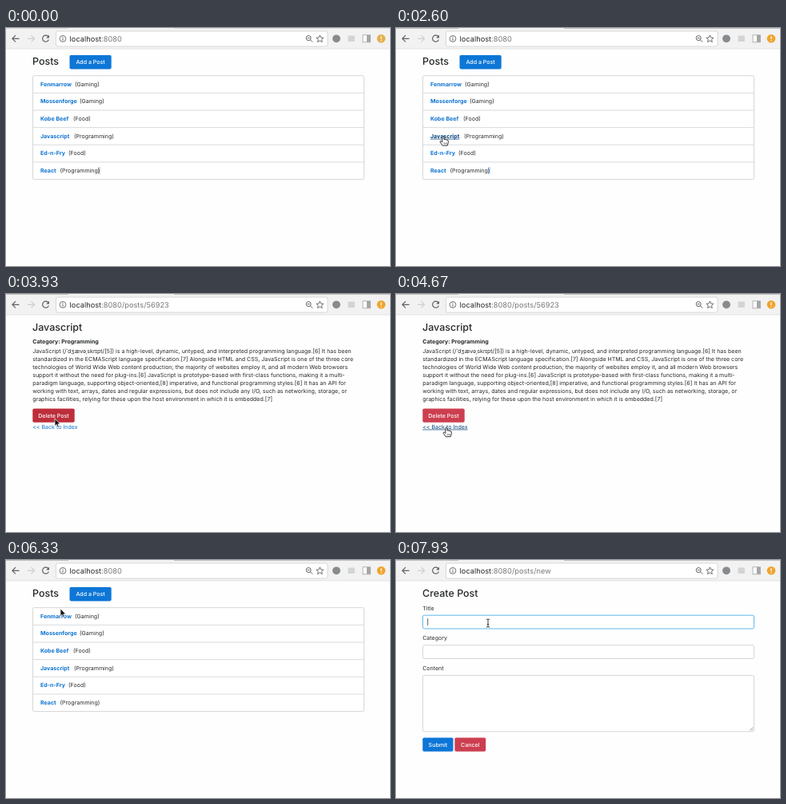
Write an HTML page that moves like this. It is 480 px wide and 298 px high and loops after 8000 ms.

```html
<!DOCTYPE html>
<html lang="en">
<head>
<meta charset="utf-8">
<title>Posts</title>
<style>
html, body { margin: 0; width: 100%; height: 100%; overflow: hidden; background: #fefefe; }
svg { display: block; width: 100%; height: 100%; }
text { font: 7.05px Inter, "Noto Sans", sans-serif; fill: #25282a; text-rendering: geometricPrecision; white-space: pre; }
.h3 { font-size: 12.5px; font-weight: 500; }
.b { font-weight: 700; }
.link { fill: #0d74d0; }
.link.hover { fill: #06437a; text-decoration: underline; }
.label { fill: #fff; font-weight: 500; text-anchor: middle; }
.blue { fill: #0d76d6; }
.blue.hover { fill: #0a5ba6; }
.red { fill: #cc3f50; }
.red.hover { fill: #bd2e3b; }
.url { font-size: 9.25px; }
.box { fill: #fff; stroke: #d4d6d8; }
.ico { fill: none; stroke: #5f6163; stroke-width: 1.2; }
</style>
</head>
<body>
<svg id="stage" viewBox="0 0 480 298"></svg>
<script>
const LOOP = 8000;
const OPEN_POST = 2960, BACK = 4760, NEW_POST = 7240, FOCUS = 7850, ENTER = 380;

const posts = [
  ["Fenmarrow", "Gaming", 86],
  ["Mossenforge", "Gaming", 92],
  ["Kobe Beef", "Food", 84],
  ["Javascript", "Programming", 85],
  ["Ed-n-Fry", "Food", 78],
  ["React", "Programming", 67.5]
];

const article = [
  "JavaScript (/ˈdʒævəˌskrɪpt/[5]) is a high-level, dynamic, untyped, and interpreted programming language.[6] It has been",
  "standardized in the ECMAScript language specification.[7] Alongside HTML and CSS, JavaScript is one of the three core",
  "technologies of World Wide Web content production; the majority of websites employ it, and all modern Web browsers",
  "support it without the need for plug-ins.[6] JavaScript is prototype-based with first-class functions, making it a multi-",
  "paradigm language, supporting object-oriented,[8] imperative, and functional programming styles.[6] It has an API for",
  "working with text, arrays, dates and regular expressions, but does not include any I/O, such as networking, storage, or",
  "graphics facilities, relying for these upon the host environment in which it is embedded.[7]"
];

// Pointer path: time, x, y
const path = [
  [ENTER, 150, 246], [860, 66, 194], [960, 60, 190], [1240, 45, 113.5], [1380, 45, 113.5],
  [1780, 50, 181], [1960, 53, 181], [2500, 59, 135.5], [3050, 59, 135.5],
  [3650, 61, 156], [4000, 61, 156], [4330, 63, 167], [5780, 63, 167],
  [6300, 68, 61], [6400, 68, 61], [6900, 104, 44], [7340, 104, 44], [7780, 115, 79], [LOOP, 115, 79]
];

const text = (x, y, s, cls = "", extra = "") =>
  `<text x="${x}" y="${y}" class="${cls}" ${extra}>${s.replace(/</g, "&lt;")}</text>`;
const rect = (x, y, w, h, attrs) => `<rect x="${x}" y="${y}" width="${w}" height="${h}" ${attrs}/>`;
const hot = (x, y, w, h, kind) => `data-hot="${x},${y},${w},${h},${kind}"`;
const button = (x, y, w, color, label, kind) =>
  rect(x, y, w, 17.4, `rx="1.8" class="${color}" ${hot(x, y, w, 17.4, kind)}`) +
  text(x + w / 2, y + 11.1, label, "label");
const field = (y, h, id) =>
  rect(33.5, y, 414, h, `rx="1.8" class="box" id="${id}" ${hot(33, y, 415, h, "beam")}`);

const toolbar = `
  ${rect(0, 0, 480, 26, 'fill="#f2f2f2"')}
  ${rect(0, 25.6, 480, 0.8, 'fill="#dcdcdc"')}
  <path id="tabs" d="M0 .4H78M210 .4H480" stroke-width=".9"/>
  <path class="ico" d="M16.5 13.3H8M12 9.2L7.9 13.3L12 17.4"/>
  <path class="ico" style="stroke:#cfcfcf" d="M27 13.3H35.5M31.5 9.2L35.6 13.3L31.5 17.4"/>
  <path class="ico" d="M53 11A4 4 0 1 0 53.4 14.6"/>
  <path d="M54 8.8V12.6H50.2Z" fill="#5f6163"/>
  ${rect(62.5, 4, 339.5, 19, 'rx="2" fill="#fff" stroke="#d0d0d0" stroke-width=".8"')}
  <circle class="ico" cx="71" cy="13.4" r="3.9" style="stroke-width:.9"/>
  <path class="ico" style="stroke-width:1" d="M71 12.8V15.7M71 11V12"/>
  <text class="url" x="79.6" y="16.9">localhost<tspan id="route" fill="#77797b"></tspan></text>
  <circle class="ico" cx="378.2" cy="12.6" r="3" style="stroke-width:1"/>
  <path class="ico" d="M380.4 14.8L383.2 17.6M376.8 12.6H379.6" style="stroke-width:1"/>
  <path class="ico" style="stroke-width:.9" d="M392.4 8.9L393.7 12L397 12.2L394.5 14.3L395.3 17.6L392.4 15.8L389.5 17.6L390.3 14.3L387.8 12.2L391.1 12Z"/>
  <circle cx="413" cy="13.3" r="4.9" fill="#888b8e"/>
  ${rect(427.5, 9.5, 8.5, 7.5, 'rx="1" fill="#d3d4d5"')}
  ${rect(446, 8.8, 9.4, 9, 'fill="#fafafa" stroke="#a3a5a7" stroke-width=".8"')}
  ${rect(451, 9, 4.4, 8.6, 'fill="#a3a5a7"')}
  <circle id="alert" cx="469" cy="13.3" r="5.3"/>
  <path d="M469 10.2V14M469 15.2V16.4" stroke="#fff" stroke-width="1.2"/>`;

const rowY = i => 59.7 + i * 21.65;
const indexPage = text(33, 46.2, "Posts", "h3") +
  button(79.5, 34, 52.2, "blue", "Add a Post", "hand") +
  rect(33.5, 59.7, 414, 129.9, 'rx="1.8" class="box"') +
  posts.map(([name, kind, x], i) => {
    const y = rowY(i), base = y + 13.1;
    return (i ? `<path d="M33.5 ${y}H447.5" stroke="#d8dadc"/>` : "") +
      text(43, base, name, "b link", hot(43, base - 7, x - 46.5, 9, "hand")) +
      (i === 5 ? rect(115, base - 7, 2.9, 9, 'id="sel"') : "") +
      text(x, base, `(${kind})`);
  }).join("");

const postPage = text(33, 45.6, "Javascript", "h3") +
  text(33.2, 61.6, "Category: Programming", "b") +
  article.map((s, i) => text(33.2, 74 + i * 9.98, s)).join("") +
  button(33.3, 143.4, 52.4, "red", "Delete Post", "arrow") +
  text(33.2, 168.6, "<< Back to Index", "link", hot(33, 162.5, 58, 8.5, "hand"));

const formPage = text(33, 45.6, "Create Post", "h3") +
  text(33.2, 63, "Title") + field(69.2, 16.8, "title") +
  `<path id="caret" d="M39.7 73.2V81.8" stroke="#333" stroke-width=".8"/>` +
  text(33.2, 100.4, "Category") + field(106.7, 16.8, "category") +
  text(33.2, 138, "Content") + field(144.5, 70.3, "content") +
  `<path d="M442.3 213.5L446.3 209.5M444.6 213.5L446.3 211.8" stroke="#777" stroke-width=".7"/>` +
  button(33.3, 222.4, 38.2, "blue", "Submit", "arrow") +
  button(73.4, 222.4, 38.8, "red", "Cancel", "hand");

const cursors = {
  arrow: `<path d="M0 0V9.4L2.2 7.4L3.7 10.9L5.3 10.2L3.8 6.8H6.8Z" fill="#111" stroke="#fff" stroke-width=".7"/>`,
  hand: `<path d="M-1.1 .6Q0-.7 1 .6V4Q2.2 3.2 3 4.3Q4.2 3.7 4.8 4.8Q6.3 4.5 6.3 6V8.3L5.2 11.7H-.8L-3.8 7.4Q-4.3 5.9-2.6 6.1L-1.1 7.4Z" fill="#fff" stroke="#222" stroke-width=".9"/>
    <path d="M1.2 8V10.2M2.8 8V10.2M4.4 8V10.2" stroke="#333" stroke-width=".6"/>`,
  beam: `<path d="M-2-5Q0-5 0-4Q0-5 2-5M0-4V4M-1.2 1.6H1.2M-2 5Q0 5 0 4Q0 5 2 5" fill="none" stroke="#222" stroke-width=".9"/>`
};

const stage = document.getElementById("stage");
stage.innerHTML = rect(0, 0, 480, 298, 'fill="#fefefe"') + toolbar +
  `<g id="index">${indexPage}</g><g id="post">${postPage}</g><g id="form">${formPage}</g><g id="pointer">` +
  Object.entries(cursors).map(([k, s]) => `<g id="${k}">${s}</g>`).join("") + "</g>";

const $ = id => document.getElementById(id);
const show = (el, on) => el.setAttribute("display", on ? "inline" : "none");
const routes = { index: ":8080", post: ":8080/posts/56923", form: ":8080/posts/new" };
const targets = {};
for (const page in routes) {
  targets[page] = [...$(page).querySelectorAll("[data-hot]")].map(el => {
    const [x, y, w, h, kind] = el.dataset.hot.split(",");
    return { el, x: +x, y: +y, w: +w, h: +h, kind };
  });
}

function pointerAt(t) {
  const i = Math.max(1, path.findIndex(p => p[0] >= t));
  const [t0, x0, y0] = path[i - 1], [t1, x1, y1] = path[i];
  const u = Math.min(1, Math.max(0, (t - t0) / (t1 - t0)));
  const e = u * u * (3 - 2 * u);
  return [x0 + (x1 - x0) * e, y0 + (y1 - y0) * e];
}

function render(t) {
  const page = t >= NEW_POST ? "form" : t >= OPEN_POST && t < BACK ? "post" : "index";
  const active = t >= ENTER;
  for (const name in routes) show($(name), name === page);
  $("route").textContent = routes[page];
  $("tabs").setAttribute("stroke", active ? "#b4b4b4" : "#d6d6d6");
  $("alert").setAttribute("fill", active ? "#f0a42c" : "#e3b04c");
  $("sel").setAttribute("fill", active ? "#b9d6fb" : "#d2d2d2");
  show($("sel"), t < OPEN_POST);

  const focused = t >= FOCUS;
  $("title").style.stroke = focused ? "#62b8e8" : "";
  show($("caret"), focused);

  const [x, y] = pointerAt(t);
  let kind = "arrow";
  for (const h of targets[page]) {
    const over = active && x >= h.x && x <= h.x + h.w && y >= h.y && y <= h.y + h.h;
    h.el.classList.toggle("hover", over);
    if (over) kind = h.kind;
  }
  show($("pointer"), active);
  $("pointer").setAttribute("transform", `translate(${x.toFixed(2)} ${y.toFixed(2)})`);
  for (const k in cursors) show($(k), k === kind);
}

const start = performance.now();
function tick() {
  render((performance.now() - start) % LOOP);
  requestAnimationFrame(tick);
}
tick();
</script>
</body>
</html>
```
